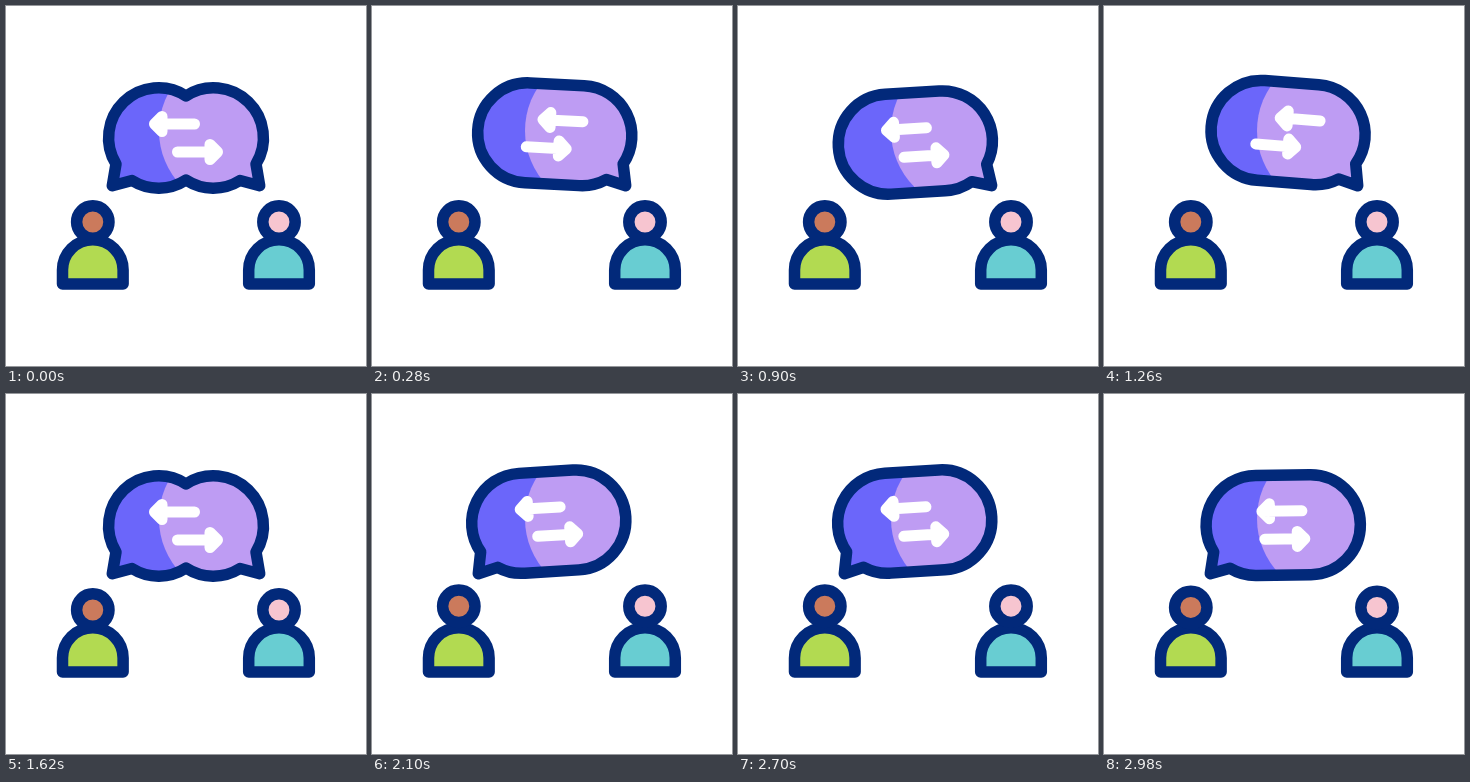
An HTML page with a canvas for the animation above (3000 ms loop, 360 by 360 pixels).

```html
<!DOCTYPE html>
<html lang="en">
<head>
<meta charset="utf-8">
<title>Conversation</title>
<style>
html, body { margin: 0; width: 100%; height: 100%; overflow: hidden; background: #fff; }
canvas { display: block; width: 360px; height: 360px; }
</style>
</head>
<body>
<canvas></canvas>
<script>
const LOOP = 3000, TALK = 1200, SWING = 400;
const NAVY = '#02297a', INDIGO = '#6b66fa', LILAC = '#be9cf3';

const canvas = document.querySelector('canvas');
const ctx = canvas.getContext('2d');
const ratio = window.devicePixelRatio || 1;
canvas.width = canvas.height = 360 * ratio;

// Right half of a bubble with its tail, shared by both outlines
const tail = 'A50 50 0 0 1 250 158 L253.7 179.7 L234 174.5 A50 50 0 0 1 ';
const merged = new Path2D('M180 90 ' + tail + '180 174 A50 50 0 0 1 126 174.5 ' +
  'L106.3 179.7 L110 158 A50 50 0 0 1 180 90 Z');
const single = new Path2D('M153 82 H207 ' + tail + '207 182 H153 A50 50 0 0 1 153 82 Z');
const body = new Path2D('M-30.3 278 V264 A30.3 30.3 0 0 1 30.3 264 V278 Z');
const arrow = new Path2D('M188.5 118 H148.5 L156 110.5 V125.5 L148.5 118 Z');

function mirror() {
  ctx.translate(360, 0);
  ctx.scale(-1, 1);
}

function outline(path, fill) {
  ctx.fillStyle = fill;
  ctx.fill(path);
  ctx.strokeStyle = NAVY;
  ctx.stroke(path);
}

function person(x, lift, skin, shirt) {
  ctx.save();
  ctx.translate(x, 0);
  outline(body, shirt);
  const head = new Path2D();
  head.arc(0, 216 - lift, 16.2, 0, 2 * Math.PI);
  outline(head, skin);
  ctx.restore();
}

// side: 1 tail on the right, -1 tail on the left, 0 both
function bubble(side, sway) {
  const path = new Path2D();
  const shape = new DOMMatrix();
  if (side) {
    const pivot = 180 + 73 * side;
    shape.translateSelf(pivot, 180).rotateSelf(5 * sway).translateSelf(-pivot, -180);
  }
  const tilt = DOMMatrix.fromMatrix(shape);
  if (side < 0) shape.translateSelf(360, 0).scaleSelf(-1, 1);
  path.addPath(side ? single : merged, shape);

  ctx.save();
  ctx.clip(path);
  ctx.fillStyle = INDIGO;
  ctx.fillRect(80, 50, 200, 150);
  ctx.fillStyle = LILAC;
  ctx.beginPath();
  ctx.arc(232.3, 124.7, 79.3, 0, 2 * Math.PI);
  ctx.fill();
  ctx.restore();
  ctx.strokeStyle = NAVY;
  ctx.stroke(path);

  const slide = side ? 12 + 12 * sway : 0;
  ctx.save();
  ctx.transform(tilt.a, tilt.b, tilt.c, tilt.d, tilt.e, tilt.f);
  ctx.fillStyle = ctx.strokeStyle = '#fff';
  ctx.lineWidth = 11;
  for (const drop of [0, 28]) {
    ctx.save();
    if (drop) mirror();
    ctx.translate(slide, drop);
    ctx.fill(arrow);
    ctx.stroke(arrow);
    ctx.restore();
  }
  ctx.restore();
}

function draw(t) {
  let side = 0, start = 0;
  if (t >= 200 && t < 200 + TALK) [side, start] = [1, 200];
  else if (t >= 1800) [side, start] = [-1, 1800];
  const sway = side * Math.sin(Math.PI * (t - start) / SWING);
  // Heads nod only while the left one talks
  const lift = side < 0 ? 2.2 - 2.2 * sway : 0;

  ctx.setTransform(ratio, 0, 0, ratio, 0, 0);
  ctx.fillStyle = '#fff';
  ctx.fillRect(0, 0, 360, 360);
  ctx.lineWidth = 11.5;
  ctx.lineCap = ctx.lineJoin = 'round';
  bubble(side, sway);
  person(86.8, lift, '#cb7a5c', '#b2da51');
  person(273, lift, '#f7c5d0', '#68cdd2');
}

const begin = performance.now();
function tick() {
  draw((performance.now() - begin) % LOOP);
  requestAnimationFrame(tick);
}
tick();
</script>
</body>
</html>
```
